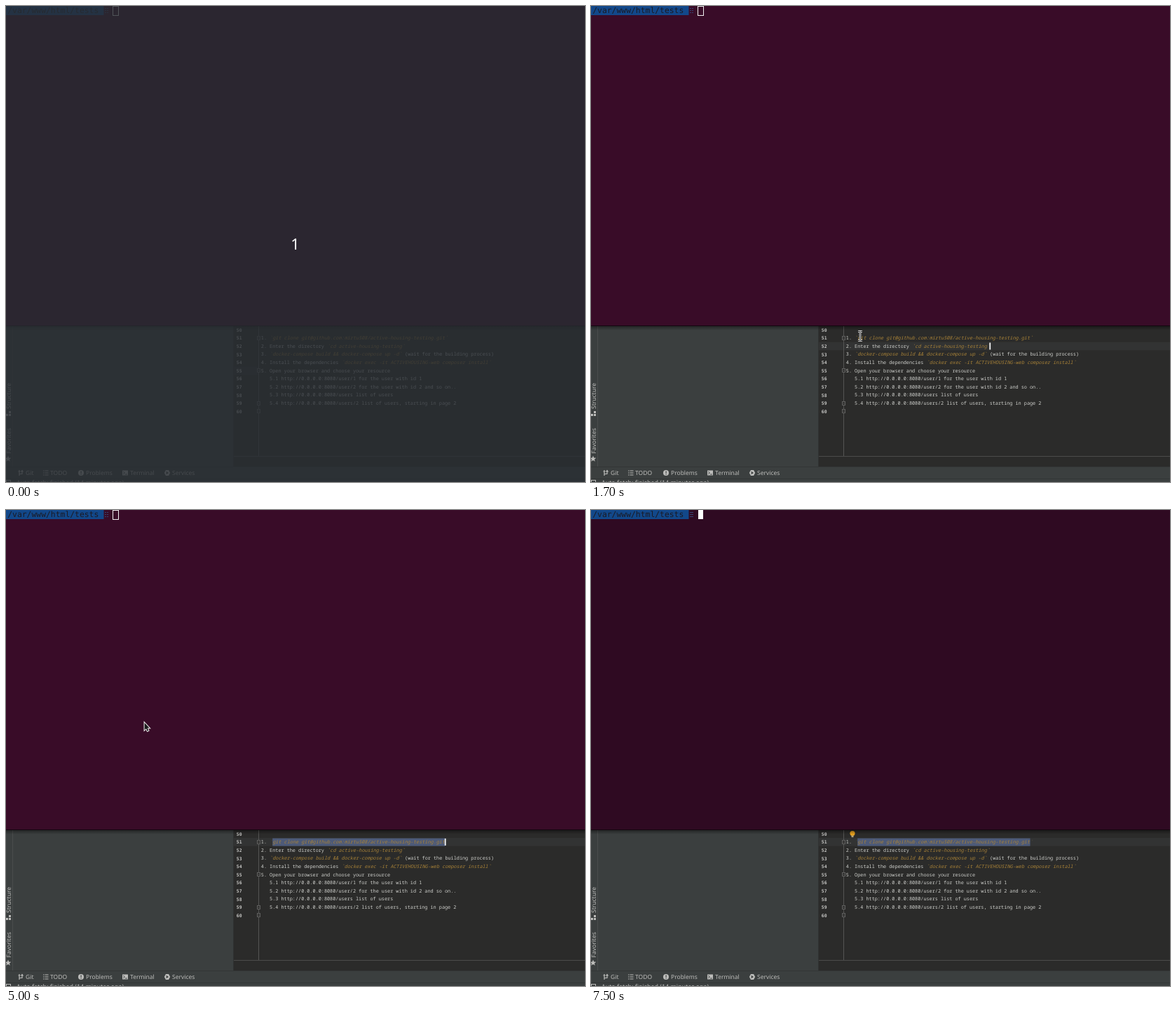
An HTML page with a canvas that plays this animation: 826 by 678 pixels, repeating every 8 s.

```html
<!DOCTYPE html>
<html lang="en">
<head>
<meta charset="utf-8">
<title>Terminal over editor</title>
<style>
html, body { margin: 0; width: 100%; height: 100%; overflow: hidden; background: #2b2b2a; }
canvas { display: block; }
</style>
</head>
<body>
<canvas id="stage" width="826" height="678"></canvas>
<script>
const ctx = document.getElementById('stage').getContext('2d');
ctx.textRendering = 'geometricPrecision';

const LOOP = 8000, STEP = 100;
const MONO = '"Noto Sans Mono", monospace', TERM = '"DejaVu Sans Mono", monospace';
const UI = '8.5px "Noto Sans", sans-serif';
const PANEL = '#3b3f3f', EDITOR = '#2b2b2a', LABEL = '#bcbcba';
const CODE_X = 363.8, CHAR = 4.105, ROW = 11.6, TOP = 461.3;

const lines = [
  '',
  '1. `git clone git@github.com:mirtu508/active-housing-testing.git`',
  '2. Enter the directory `cd active-housing-testing`',
  '3. `docker-compose build && docker-compose up -d` (wait for the building process)',
  '4. Install the dependencies `docker exec -it ACTIVEHOUSING-web composer install`',
  '5. Open your browser and choose your resource',
  '   5.1 http://0.0.0.0:8080/user/1 for the user with id 1',
  '   5.2 http://0.0.0.0:8080/user/2 for the user with id 2 and so on..',
  '   5.3 http://0.0.0.0:8080/users list of users',
  '   5.4 http://0.0.0.0:8080/users/2 list of users, starting in page 2',
  ''
];

// Caret placements: time, row, column; a selection starts at column `from`.
const carets = [
  { t: 700, row: 2, col: 50 },
  { t: 2000, row: 1, col: 4 },
  { t: 3400, row: 1, col: 63, from: 4 },
  { t: 5000, row: 1, col: 64, from: 4 }
];

// Mouse path: time, x, y
const path = [
  [500, 560, 446], [700, 580, 482], [900, 574, 483], [1100, 510, 462], [1300, 430, 445],
  [1500, 402, 462], [1700, 384, 470], [2000, 382, 471], [2200, 384, 494], [2300, 386, 496],
  [2600, 490, 488], [2900, 618, 474], [3000, 628, 471], [3200, 626, 471], [3400, 623, 472],
  [3500, 520, 527], [3600, 390, 515], [3700, 265, 450], [3800, 171, 382], [3900, 184, 335],
  [4000, 197, 302], [5500, 197, 302], [5700, 218, 262], [6000, 255, 205], [6100, 250, 226],
  [6200, 250, 226], [6300, 243, 218], [6400, 243, 218], [6800, 290, 117], [7400, 290, 117]
];

const rowY = i => TOP + i * ROW;
const colX = c => CODE_X + c * CHAR;

function rect(x, y, w, h, color) {
  ctx.fillStyle = color;
  ctx.fillRect(x, y, w, h);
}
function box(x, y, w, h, color) {
  ctx.strokeStyle = color;
  ctx.lineWidth = 1;
  ctx.strokeRect(x, y, w, h);
}
function text(s, x, y, font, color) {
  ctx.font = font;
  ctx.fillStyle = color;
  ctx.fillText(s, x, y);
}
function shape(d, x, y, fill, stroke, width = 1) {
  const p = new Path2D(d);
  ctx.save();
  ctx.translate(x, y);
  ctx.lineWidth = width;
  if (stroke) { ctx.strokeStyle = stroke; ctx.stroke(p); }
  if (fill) { ctx.fillStyle = fill; ctx.fill(p); }
  ctx.restore();
}
function disc(x, y, r, color) {
  ctx.fillStyle = color;
  ctx.beginPath();
  ctx.arc(x, y, r, 0, 7);
  ctx.fill();
}
function sideLabel(s, y) {
  ctx.save();
  ctx.translate(6.5, y);
  ctx.rotate(-Math.PI / 2);
  text(s, 0, 0, UI, LABEL);
  ctx.restore();
}

function drawPanels() {
  rect(0, 456, 826, 222, PANEL);
  rect(9, 456, 1, 201, '#4a4d4d');
  rect(325, 456, 501, 201, EDITOR);
  rect(324, 456, 1, 201, '#303232');
  rect(0, 656, 826, 1, '#333636');
  rect(0, 673, 826, 1, '#333636');
  rect(325, 641, 501, 1, '#4b4b4a');

  sideLabel('Structure', 574);
  shape('M0 3h3v3h-3zM4 3h3v3h-3zM4 -1h3v3h-3z', 0, 578, LABEL);
  sideLabel('Favorites', 637.5);
  shape('M0-4.5L1.2-1.4 4.3-1.3 1.9.7 2.7 3.8 0 2-2.7 3.8-1.9.7-4.3-1.3-1.2-1.4Z', 3, 645, LABEL);

  const labels = { Git: 28, TODO: 63, Problems: 114, Terminal: 177, Services: 237 };
  for (const name in labels) text(name, labels[name], 668.2, UI, LABEL);
  shape('M1.5 0v8M0 2h3M1.5 5.5h4v-4M4 2.5l1.5-2 1.5 2', 17.5, 661, null, LABEL, 1.2);
  shape('M0 1h1.5M2.5 1h5M0 4h1.5M2.5 4h5M0 7h1.5M2.5 7h5', 53, 661, null, LABEL, 1.2);
  disc(107, 665, 4, LABEL);
  rect(106.5, 662.5, 1.2, 3, PANEL);
  rect(106.5, 666.4, 1.2, 1.2, PANEL);
  rect(166, 661.5, 8, 7, LABEL);
  shape('M1.3 1.5l2 2-2 2M4.2 5.5h2.5', 166, 661.5, null, PANEL);
  shape('M-2-4H2L4.2 0 2 4H-2L-4.2 0Z', 230, 665, LABEL);
  shape('M-1.3-2.2L2 0-1.3 2.2Z', 230, 665, PANEL);

  box(0.5, 675.5, 6, 6, LABEL);
  text('Auto fetch: finished (14 minutes ago)', 15, 682, '8.9px "Noto Sans", sans-serif', LABEL);
}

function drawCode(t) {
  const caret = carets.filter(c => c.t <= t).pop();
  if (caret) rect(325, rowY(caret.row) - 5.8, 501, ROW, '#323333');
  else rect(325, rowY(5) - 5.8, 36, ROW, '#323333');
  rect(360, 456, 1, 185, '#545453');

  if (caret && caret.from) {
    rect(colX(caret.from), rowY(caret.row) - 5.3, (caret.col - caret.from) * CHAR, 11, '#4d5a78');
  }

  lines.forEach((line, i) => {
    const y = rowY(i) + 2.3;
    text(50 + i, 328.8, y + 0.2, `bold 6.4px ${TERM}`, '#c4c4c2');
    let col = 0;
    line.split('`').forEach((part, k) => {
      const code = k % 2;
      const tick = caret && caret.row === i && i === 1 ? '#55503f' : '#a88238';
      if (code) {
        text('`', colX(col), y, `italic 6.84px ${MONO}`, tick);
        text('`', colX(col + part.length + 1), y, `italic 6.84px ${MONO}`, tick);
        col++;
      }
      text(part, colX(col), y, `${code ? 'italic ' : ''}6.84px ${MONO}`, code ? '#a88238' : '#cfd0cc');
      col += part.length + code;
    });
  });

  for (const i of [1, 5, 9, 10]) {
    const y = Math.round(rowY(i));
    rect(358, y - 3, 5, 6, EDITOR);
    box(358.5, y - 2.5, 4, 5, '#60605f');
    rect(359.5, y - 0.5, 2, 1, '#60605f');
  }

  if (caret && t < 7400 && (t - caret.t) % 1000 < 500) {
    rect(colX(caret.col) - 0.7, rowY(caret.row) - 5, 1.8, 10, '#f4f4f4');
  }
  if (t >= 4200 && t < 5000 || t >= 6000) {
    disc(373, 460.6, 3.6, '#e6a01f');
    rect(371.5, 463.6, 3, 2.6, '#b5a47c');
  }
}

function drawTerminal(t) {
  const focused = t >= 7400;
  const shade = ctx.createLinearGradient(0, 456, 0, 462);
  shade.addColorStop(0, 'rgba(0,0,0,.4)');
  shade.addColorStop(1, 'rgba(0,0,0,0)');
  rect(0, 456, 826, 6, shade);
  rect(0, 0, 826, 455, focused ? '#2f0a22' : '#390c28');
  rect(0, 455, 826, 1, '#150610');
  rect(0, 0, 139.5, 13, '#12488a');
  text('/var/www/html/tests', 2.2, 10.3, `11.38px ${TERM}`, '#1b1a24');
  for (const y of [3, 6, 9]) {
    if (focused) rect(141, y, 5, 1, '#394471');
    else { rect(141, y, 2, 1, '#394471'); rect(144, y, 2, 1, '#394471'); }
  }
  if (focused) rect(153, 0, 7, 13, '#fff');
  else box(152.5, 0.5, 8, 13, '#f0f0f0');
}

function drawMouse(t) {
  const k = path.findIndex(p => p[0] > t);
  if (k < 1) return;
  const [t0, x0, y0] = path[k - 1], [t1, x1, y1] = path[k];
  const f = (t - t0) / (t1 - t0), x = x0 + (x1 - x0) * f, y = y0 + (y1 - y0) * f;
  if (x > 325 && y > 456) {
    const beam = 'M-3-6.5H-.8L0-5.7.8-6.5H3M0-5.7V5.7M-3 6.5H-.8L0 5.7.8 6.5H3';
    shape(beam, x, y, null, '#fff', 2.6);
    shape(beam, x, y, null, '#111', 1);
  } else {
    shape('M.6 1V11.4L3 9.2 4.7 13 6.3 12.3 4.7 8.6H7.6Z', x, y, '#1a1a1a', '#f2f2f2', 2);
  }
}

function drawCountdown() {
  rect(0, 0, 826, 678, 'rgba(41,46,50,.8)');
  ctx.textAlign = 'center';
  text('1', 412.5, 346.5, '22px "Noto Sans", sans-serif', '#fff');
  ctx.textAlign = 'left';
}

function frame(now) {
  const t = Math.floor(now % LOOP / STEP) * STEP;
  drawPanels();
  drawCode(t);
  drawTerminal(t);
  drawMouse(t);
  if (t < 100) drawCountdown();
  requestAnimationFrame(frame);
}
const start = performance.now();
frame(0);
function loop() {}
</script>
</body>
</html>
```
